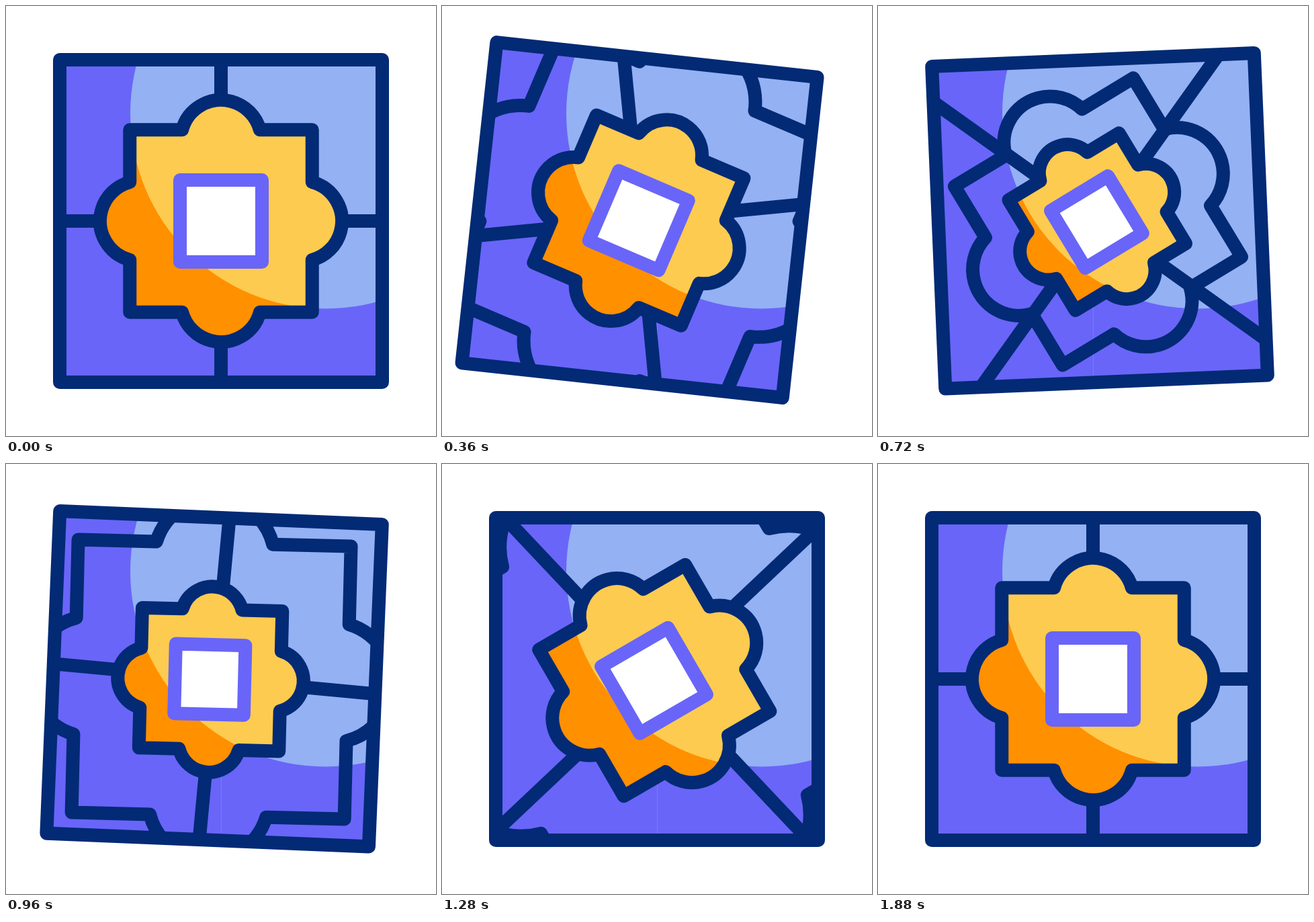
An HTML page with a canvas for the animation above (2 s loop, 640 by 640 pixels).

```html
<!DOCTYPE html>
<html lang="en">
<head>
<meta charset="utf-8">
<title>Swinging tile</title>
<style>
html, body { margin: 0; width: 100%; height: 100%; overflow: hidden; background: #fff; }
canvas { display: block; width: 100vw; height: 100vh; }
</style>
</head>
<body>
<canvas id="stage"></canvas>
<script>
const SIZE = 640, LOOP = 2000, STEP = 40, LINE = 20;
const NAVY = '#032a75', PURPLE = '#6965f8', SKY = '#93b1f3';
const YELLOW = '#fdcb50', ORANGE = '#ff9000', WHITE = '#fff';

// Keys are [ms, value] pairs.
const swing = [[80, 0], [317, 7], [603, -6.08], [872, 3.07], [1156, 0]];
const cross = [[80, 0], [1880, -180]];
const turn = [[80, 0], [360, 16.9], [720, 61.2], [900, 90], [1880, 0]];
const starSize = [[80, 1], [715, 0.707], [1550, 1]];
const gemSize = [[80, 1], [718, 0.817], [1620, 1]];
const ringSize = [[80, 2.35], [360, 1.61], [670, 1.125], [720, 1.146],
                  [960, 1.496], [1280, 1.92], [1560, 2.3], [1880, 2.4]];

const canvas = document.getElementById('stage');
const ctx = canvas.getContext('2d');
const ratio = window.devicePixelRatio || 1;
canvas.width = canvas.height = SIZE * ratio;

const rad = deg => deg * Math.PI / 180;

function slope(keys, i) {
  if (i <= 0 || i >= keys.length - 1) return 0;
  const rate = j => (keys[j + 1][1] - keys[j][1]) / (keys[j + 1][0] - keys[j][0]);
  const a = rate(i - 1), b = rate(i);
  return a * b > 0 ? 2 * a * b / (a + b) : 0;
}

// Smooth monotone curve through the keys, flat at turning points.
function at(keys, t) {
  const last = keys.length - 1;
  if (t <= keys[0][0]) return keys[0][1];
  if (t >= keys[last][0]) return keys[last][1];
  let i = 0;
  while (t > keys[i + 1][0]) i++;
  const [t0, v0] = keys[i], [t1, v1] = keys[i + 1];
  const len = t1 - t0, u = (t - t0) / len, s = u * u * (3 - 2 * u);
  return v0 + (v1 - v0) * s
    + len * u * (1 - u) * ((1 - u) * slope(keys, i) - u * slope(keys, i + 1));
}

// Rotates and scales a path about an anchor without scaling its stroke.
function place(path, deg, scale, x, y) {
  const m = new DOMMatrix().translate(x, y).rotate(deg).scale(scale).translate(-x, -y);
  const out = new Path2D();
  out.addPath(path, m);
  return out;
}

function makeStar() {
  const half = 135.75, off = 120, r = 60;
  const dip = Math.asin((half - off) / r);
  const path = new Path2D();
  for (let i = 0; i < 4; i++) {
    const a = i * Math.PI / 2, c = Math.cos(a), s = Math.sin(a);
    path.arc(off * s, -off * c, r, Math.PI + dip + a, 2 * Math.PI - dip + a);
    path.lineTo(half * (c + s), half * (s - c));
  }
  path.closePath();
  return path;
}

function box(half) {
  const path = new Path2D();
  path.rect(-half, -half, 2 * half, 2 * half);
  return path;
}

const star = makeStar(), gem = box(61), frame = box(240);

const light = new Path2D();
light.arc(475.5, 160, 290.5, 0, 2 * Math.PI);

function stroke(path, color) {
  ctx.strokeStyle = color;
  ctx.stroke(path);
}

// Fills a shape in two tones split by the fixed circle of light.
function twoTone(shape, pose, dark, bright, seam) {
  ctx.save();
  ctx.setTransform(pose);
  ctx.fillStyle = dark;
  ctx.fill(shape);
  ctx.clip(shape);
  ctx.setTransform(ratio, 0, 0, ratio, 0, 0);
  if (seam) {
    ctx.fillStyle = 'rgba(255,255,255,.12)';
    ctx.fillRect(320, 320, 1, 230);
  }
  ctx.fillStyle = bright;
  ctx.fill(light);
  ctx.restore();
}

function draw(t) {
  ctx.setTransform(ratio, 0, 0, ratio, 0, 0);
  ctx.fillStyle = WHITE;
  ctx.fillRect(0, 0, SIZE, SIZE);
  ctx.lineWidth = LINE;
  ctx.lineJoin = 'round';

  // The tile hangs from the middle of its top edge.
  ctx.translate(320, 80);
  ctx.rotate(rad(at(swing, t)));
  ctx.translate(0, 240);
  const pose = ctx.getTransform();
  const deg = at(turn, t);

  twoTone(frame, pose, PURPLE, SKY, true);

  ctx.save();
  ctx.clip(frame);
  const bars = new Path2D('M0-360V360M-360 0H360');
  stroke(place(bars, at(cross, t), 1, 0, 0), NAVY);
  stroke(place(star, deg, at(ringSize, t), -1.8, -1.8), NAVY);
  ctx.restore();

  const body = place(star, deg, at(starSize, t), -4, -2);
  twoTone(body, pose, ORANGE, YELLOW);
  stroke(body, NAVY);

  const core = place(gem, deg, at(gemSize, t), -4.5, -2.7);
  ctx.fillStyle = WHITE;
  ctx.fill(core);
  stroke(core, PURPLE);

  stroke(frame, NAVY);
}

const start = performance.now();
function tick() {
  const t = (performance.now() - start) % LOOP;
  draw(Math.floor(t / STEP) * STEP);
  requestAnimationFrame(tick);
}
tick();
</script>
</body>
</html>
```
